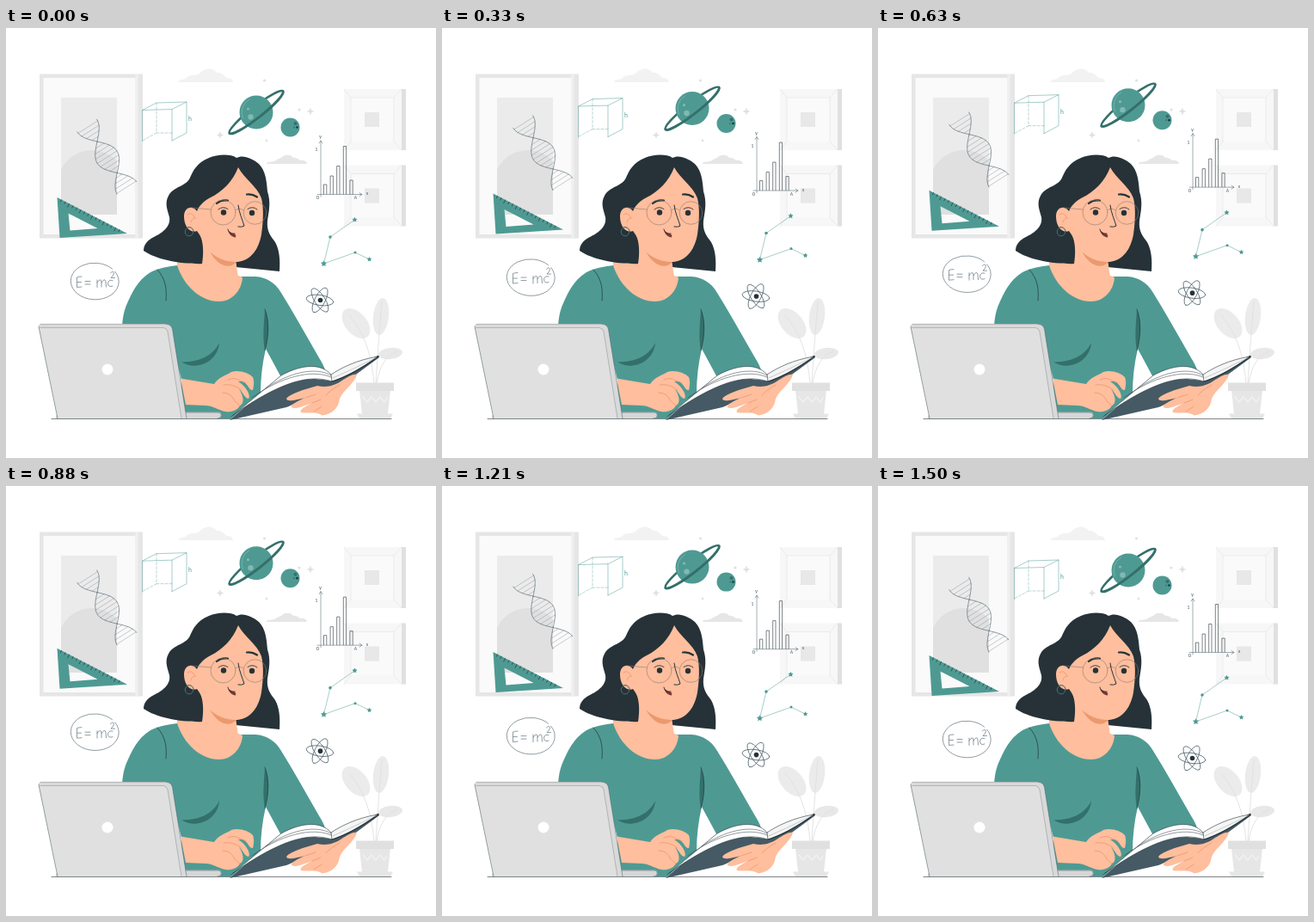
Write an HTML page with a canvas that moves like this. It is 500x500 px and loops after 1.54 s.

```html
<!DOCTYPE html>
<html lang="en">
<head>
<meta charset="utf-8">
<title>Study time</title>
<style>
html, body { margin: 0; width: 100%; height: 100%; overflow: hidden; background: #fff; }
canvas { display: block; width: 500px; height: 500px; }
</style>
</head>
<body>
<canvas id="stage" width="500" height="500"></canvas>
<script>
const ctx = document.getElementById('stage').getContext('2d');
const TEAL = '#4e9a93', DEEP = '#34706b', INK = '#263238', SLATE = '#455a64';
const SKIN = '#ffbe9d', BLUSH = '#eb996e';
const LOOP = 1540, FRAME = 1000 / 24, LAST = 36, LIFT = 10;

const fill = (d, color) => { ctx.fillStyle = color; ctx.fill(new Path2D(d)); };
function line(d, color = INK, width = 0.7, dash = []) {
  ctx.strokeStyle = color;
  ctx.lineWidth = width;
  ctx.setLineDash(dash);
  ctx.stroke(new Path2D(d));
  ctx.setLineDash([]);
}
const rect = (x, y, w, h, color) => { ctx.fillStyle = color; ctx.fillRect(x, y, w, h); };
function oval(x, y, rx, ry = rx, turn = 0, from = 0, to = 2 * Math.PI) {
  ctx.beginPath();
  ctx.ellipse(x, y, rx, ry, turn, from, to);
}
function dot(x, y, r, color, ry = r, turn = 0) {
  oval(x, y, r, ry, turn);
  ctx.fillStyle = color;
  ctx.fill();
}
function ring(x, y, rx, color, width, ry = rx, turn = 0, from, to) {
  oval(x, y, rx, ry, turn, from, to);
  ctx.strokeStyle = color;
  ctx.lineWidth = width;
  ctx.stroke();
}
function star(x, y, r, points, inner, color) {
  ctx.beginPath();
  for (let i = 0; i < points * 2; i++) {
    const a = i * Math.PI / points - Math.PI / 2, d = i % 2 ? r * inner : r;
    ctx.lineTo(x + d * Math.cos(a), y + d * Math.sin(a));
  }
  ctx.fillStyle = color;
  ctx.fill();
}
function label(text, x, y, color = SLATE, size = 6) {
  ctx.font = `${size}px Lato, sans-serif`;
  ctx.textAlign = 'center';
  ctx.fillStyle = color;
  ctx.fillText(text, x, y);
}

function wallFrame(y) {
  ctx.save();
  ctx.translate(393, y);
  rect(0, 0, 68, 71, '#f7f7f7');
  rect(67, 0, 5, 71, '#e0e0e0');
  rect(8, 10, 50, 51, '#fafafa');
  line('M8 61V10H58V61M0 0L8 10M67 0L58 10M0 71L8 61M67 71L58 61', '#e6e6e6', 0.7);
  rect(24, 27, 17, 17, '#e8e8e8');
  ctx.restore();
}

function room() {
  rect(39, 53.5, 120, 191, '#e6e6e6');
  rect(43.5, 58, 107, 182, '#fafafa');
  rect(150.5, 53.5, 3, 191, '#f0f0f0');
  rect(64, 81, 65, 136, '#ebebeb');
  ctx.save();
  ctx.beginPath();
  ctx.rect(64, 81, 65, 136);
  ctx.clip();
  dot(100, 182, 40, '#e0e0e0');
  rect(64, 182, 65, 35, '#e0e0e0');
  ctx.restore();

  wallFrame(71);
  wallFrame(159.5);

  fill('M200 63C201 59 207 61 210 58C213 53 222 57 226 52C231 46 241 46 245 52C252 51 254 57 257 58C262 58 264 61 264 63Z', '#f2f2f2');
  fill('M303 158C304 154 310 157 314 154C317 151 320 152 322 149C326 147 332 147 334 151C338 150 340 153 342 154C347 153 350 156 350 158Z', '#e6e6e6');
  star(354, 97, 4.5, 4, 0.4, '#e0e0e0');
  star(249, 124.5, 4.2, 4, 0.4, '#e0e0e0');
  dot(341, 95, 1.6, '#e0e0e0');
  dot(300.5, 61, 1.5, '#e0e0e0');
  dot(303, 131, 1.4, '#e0e0e0');
}

function plant() {
  dot(407, 343.5, 12.5, '#ebebeb', 20.5, -0.72);
  dot(436, 335.5, 9, '#ebebeb', 21.5, 0.12);
  dot(447, 378.5, 14, '#e8e8e8', 6.5, -0.12);
  line('M399 334Q424 362 428 413M437 318Q432 380 430 413M455 376Q436 382 431 413', '#e0e0e0', 0.9);
  fill('M411 421H447L444 449H414Z', '#e6e6e6');
  rect(407, 412.5, 44, 9.5, '#e0e0e0');
  line('M415 429l5 6 5-6 5 6 5-6 5 6 3-5', '#f2f2f2', 1.2);
  fill('M408 448.5H450L447 454H411Z', '#e6e6e6');
}

function body() {
  fill('M199 276C190 277 178 279 168 284C152 294 146 309 141 320C136 331 135 342 135 352H190L204 409V454H262L296 425C296 408 298 390 302 373L322 410L372 402C371 393 364 384 358 373C346 352 333 329 320 308C313 296 303 290 290 289H270L248 270Z', TEAL);
  fill('M199 270V276C207 300 226 318 248 318C262 318 274 306 275 290L268 287V266Z', SKIN);
  line('M176 281C186 292 187 304 186 317', INK, 0.7);
  fill('M204 388.5C224 400 247 386 248 366C241 380 228 388 204 388.5Z', DEEP);
  fill('M301 327C307 341 306 358 301 375C298 360 300 343 301 327Z', DEEP);
  line('M301 327C306 340 306 358 301 375', INK, 0.6);
}

function head() {
  fill('M268 151C261 146 245 147 236 151C222 157 218 165 214 174C210 184 195 184 189 195C184 204 188 212 190 220C192 232 180 239 172 243C164 247 160 252 160 259C176 270 205 275 232 274H267V278L318 283C319 270 318 258 313 249C307 241 303 236 304 224C306 212 308 202 304 190C303 178 302 166 294 158C286 151 275 147 268 151Z', INK);
  fill('M224 236C230 248 230 262 228 274L232 290H270L266 262Z', SKIN);
  fill('M237 260C246 268 256 271 268 271.5C261 281 247 278 237 260Z', BLUSH);
  fill('M270 162C264 178 252 190 238 197C230 201 225 206 222 213C216 205 207 209 207 219C207 231 214 239 222 236C226 241 229 247 230 255L238 261C248 270 260 272 269 272C286 270 294 256 297 240C299 226 300 210 297 198C292 184 277 175 270 162Z', SKIN);
  line('M211 217Q216 213 220 221M215 226Q216 221 220 221', BLUSH, 0.8);
  ring(213, 237, 4.8, TEAL, 0.8, 5);
  ring(213, 237, 5.4, INK, 0.5, 5.6);

  line('M245 204Q250 199.5 258 200.5M280 193.5Q286 192.5 292 196.5', INK, 2.2);
  line('M247 211Q252 206.5 258 210.5M281 210.5Q287 206.5 292 211', INK, 0.9);
  dot(253, 214.5, 3.2, INK);
  dot(286, 215, 3.2, INK);
  ring(252.5, 214.5, 14.5, '#8b7b73', 0.6);
  ring(289.5, 215, 13.3, '#8b7b73', 0.6);
  line('M267 212Q271 208 276 212M238 211L216 209', '#8b7b73', 0.6);
  line('M270 206C271 215 275 223 277 230Q274 232 270 231', INK, 1);
  fill('M258 235C259 240 263 243 267 243.5C268 240 266 239 263 238.5Q260 237 258 235Z', '#7b3a35');
  line('M258 234C259 238 262 240 266 239', INK, 0.9);
}

function book() {
  fill('M260 456L320 404L378 410L433 380.5L434 383L385 419C358 421 340 436 326 441Z', SLATE);
  fill('M264 450L320 404C338 394 364 387 378 403L379 411C352 402 318 412 264 450Z', '#fff');
  fill('M378 403C390 395 408 386 432 382C414 395 396 405 379 411Z', '#f5f5f5');
  line('M262 452L320 404C338 394 364 387 378 403L379 411C352 402 318 412 264 450', INK, 0.6);
  line('M286 430C318 406 356 396 378 406M302 419C328 401 360 393 378 404', INK, 0.5);
  line('M378 403C390 395 408 386 432 382', INK, 0.6);
  line('M379 411C396 406 416 394 433 382', INK, 1.2);
  line('M380 407Q405 396 431 383', '#9aa4a9', 0.5);
}

function hands() {
  fill('M203 407.5L242 414C247 406 256 404 262 400C270 397 283 401 287 406C289 411 288 417 287 421C283 422 282 415 276 411L270 411C280 417 285 428 282 431C277 430 276 424 271 420C277 429 277 437 272 439C269 445 261 447 255 446C246 444 240 439 232 439L209 438Z', SKIN);
  line('M258 409Q265 406 270 409L279 413M253 415Q264 413 274 421M252 424Q262 424 266 434L272 439', BLUSH, 0.8);
  fill('M408 403C403 402 398 406 392 409C381 417 372 418 362 416L345 421C336 424 328 428 326 431C327 435 335 433 348 430C338 434 331 438 332 441C336 444 344 440 356 436C346 441 341 444 343 447C351 449 359 445 368 450.5C381 449 387 440 388 431C392 421 405 414 408 403Z', SKIN);
  line('M348 430L360 426M356 436L366 432M388 415Q377 421 372 427M358 446L367 440', BLUSH, 0.8);
}

function laptop() {
  fill('M207 446.5H247Q251 447 250.5 451Q250 454 246 454H58V450Z', '#d6d6d6');
  line('M208 447H247Q251 448 250 452Q249 454 246 454', SLATE, 0.5);
  fill('M41 344H186Q192 344.5 193.5 350L210 454H60L38 349Q37 344.5 41 344Z', '#d9d9d9');
  fill('M41 348H183Q187 348.5 188 353L204 454H60L38.5 350Z', '#e0e0e0');
  line('M38 347L60 454M186 344.3Q192 344.5 193.5 350L210 454', SLATE, 0.5);
  line('M40 344.3H186M40 348.5H183Q187 349 188 353L204 454', '#828a8e', 0.5);
  dot(118, 397, 6.5, '#fff');
}

function dna() {
  const dx = 0.537, dy = 0.843, half = 43.3;
  const at = (s, side) => {
    const w = side * 13.5 * Math.sin(Math.PI * s / half);
    return [106 + dx * s + dy * w, 132 + dy * s - dx * w];
  };
  ctx.strokeStyle = '#8f999e';
  ctx.lineWidth = 0.5;
  ctx.beginPath();
  for (let s = -20; s < 65; s += 5.2) {
    ctx.moveTo(...at(s, 1));
    ctx.lineTo(...at(s, -1));
  }
  ctx.stroke();
  ctx.strokeStyle = SLATE;
  ctx.lineWidth = 0.6;
  for (const side of [1, -1]) {
    ctx.beginPath();
    for (let s = -22; s <= 64; s++) ctx.lineTo(...at(s, side));
    ctx.stroke();
  }
}

function setSquare() {
  ctx.fillStyle = TEAL;
  ctx.fill(new Path2D('M59.5 197L62.5 244L141 239ZM72.5 215.5L74.5 235.5L106.5 233Z'), 'evenodd');
  ctx.strokeStyle = INK;
  ctx.lineWidth = 0.7;
  ctx.beginPath();
  for (let i = 1; i < 17; i++) {
    const x = 60 + i * 4.5, y = 197.5 + i * 2.32, len = i % 3 ? 2.5 : 4;
    ctx.moveTo(x, y);
    ctx.lineTo(x - len * 0.45, y + len * 0.89);
  }
  ctx.stroke();
}

function cube() {
  line('M158.5 131.5V95.5L193 94.5V131M158.5 95.5L175 87L210 86V122L193 131M193 94.5L210 86', TEAL, 0.5);
  line('M175 87V122L158.5 131M175 122H193', TEAL, 0.4, [3, 2]);
  label('h', 214, 108, TEAL, 7);
}

function planets() {
  const tilt = -0.665, x = 291, y = 98;
  ring(x, y, 39.5, DEEP, 2.6, 6.5, tilt, Math.PI, 2 * Math.PI);
  dot(x, y, 19.5, TEAL);
  ring(x, y, 17, '#7db5b0', 0.8, 17, 0, 2.7, 4.2);
  dot(284.5, 103.5, 3.2, '#82b8b3');
  dot(281.5, 94, 1.6, '#82b8b3');
  ring(x, y, 39.5, DEEP, 3, 6.5, tilt, 0, Math.PI);
  dot(330.5, 115.5, 11, TEAL);
  dot(336.5, 111, 2, DEEP);
  dot(338.5, 115.5, 1.3, INK);
  dot(335, 115.5, 0.9, DEEP);
}

function chart() {
  line('M366 196V131M364 134L366 131L368 134M362 193.5H414M411 191.5L414 193.5L411 195.5', SLATE, 0.5);
  [182, 172, 160.5, 137.5, 177].forEach((top, i) => {
    const x = 369.5 + i * 7.6;
    line(`M${x} 193V${top}H${x + 3.3}V193`, INK, 0.6);
  });
  label('y', 365.5, 128);
  label('1', 361, 143, SLATE, 5);
  label('0', 362.5, 199);
  label('A', 406.5, 199, SLATE, 5);
  label('x', 420, 194, SLATE, 5);
}

function constellation() {
  line('M405.5 223L377 243L369.5 274L406 261L422.5 269', TEAL, 0.5);
  star(405.5, 223, 3.2, 5, 0.5, TEAL);
  star(369.5, 274, 3.8, 5, 0.5, TEAL);
  star(422.5, 269, 3, 5, 0.5, TEAL);
  dot(377, 243, 1.8, TEAL);
  dot(406, 261, 1.5, TEAL);
}

function atom() {
  for (const turn of [0.15, 1.0, 2.05]) ring(365, 316.5, 16, SLATE, 0.8, 6, turn);
  dot(365.5, 316.5, 2.8, INK);
}

function formula() {
  ring(103.3, 294.5, 28, SLATE, 0.6, 21.3, 0.03, -0.6, 5.5);
  line('M88 289Q84 289 82.5 290V301.5L88 301M83 295.5H87.5', SLATE, 0.6);
  line('M92 294.5H98M92 298H98', SLATE, 0.6);
  line('M106 301.5V293M106 296Q110 290 111 295V301M111 296Q115 290 116 295L116.5 301', SLATE, 0.6);
  line('M124 293.5Q119 292 118.5 297Q119 302 124 300', SLATE, 0.6);
  line('M121.5 285Q124 281.5 125.5 285Q125 288 122 290.5H126.5', SLATE, 0.6);
}

function draw(time) {
  const t = time % LOOP;
  const frame = Math.min(LAST, Math.floor((t + 4) / FRAME));
  // Linear rise over the first half, linear fall over the second.
  const lift = LIFT * (1 - Math.abs(1 - 2 * frame / LAST));

  ctx.lineCap = ctx.lineJoin = 'round';
  rect(0, 0, 500, 500, '#fff');
  room();
  plant();
  line('M53 454.5H448', INK, 0.6);
  body();
  head();
  laptop();
  book();
  hands();

  ctx.save();
  ctx.translate(0, -lift);
  [dna, setSquare, cube, planets, chart, constellation, atom, formula].forEach(part => part());
  ctx.restore();
}

let start;
function tick(now) {
  start ??= now;
  draw(now - start);
  requestAnimationFrame(tick);
}
draw(0);
requestAnimationFrame(tick);
</script>
</body>
</html>
```
